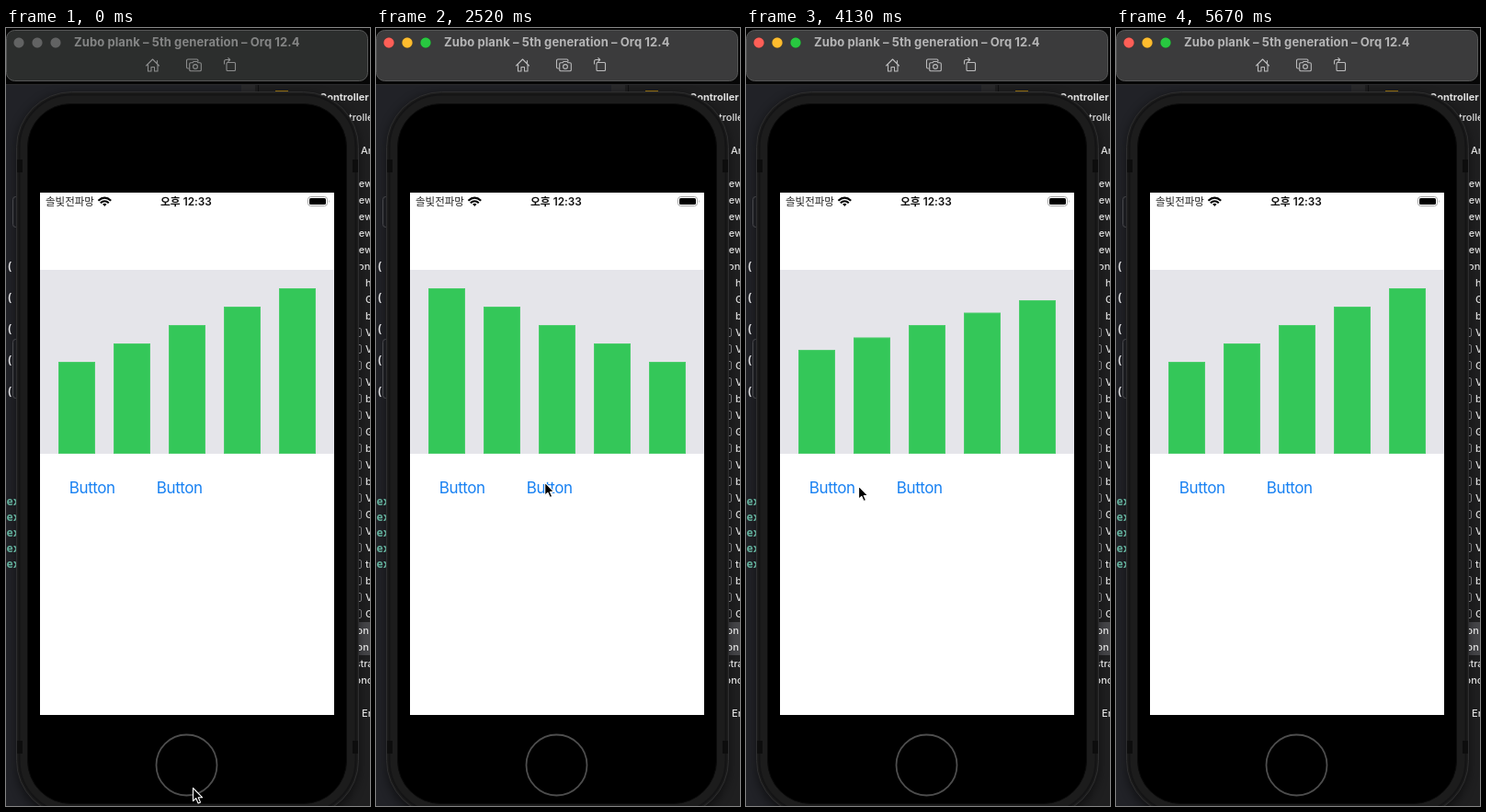
These frames come from a looping animation (396 px wide and 846 px high, 6.16 s). An HTML page:

```html
<!DOCTYPE html>
<html lang="ko">
<head>
<meta charset="utf-8">
<title>Bar chart in a phone simulator</title>
<style>
  html, body { margin: 0; width: 100%; height: 100%; overflow: hidden; background: #000; }
  svg { display: block; width: 100%; height: 100%; }
  text { font-family: Inter, "Noto Sans CJK KR", "Noto Sans CJK", sans-serif; white-space: pre; }
  .code text { font: 600 12px "Noto Sans Mono", monospace; }
  .outline text { font-size: 11px; fill: #dedede; }
  .icons { fill: none; stroke-width: 1.1; stroke-linejoin: round; stroke-linecap: round; }
  .btn { font-size: 17px; letter-spacing: -.4px; fill: #1780f2; }
</style>
</head>
<body>
<svg viewBox="0 0 396 846">
  <defs>
    <filter id="soft" x="-20%" y="-20%" width="140%" height="140%"><feGaussianBlur stdDeviation="6"/></filter>
  </defs>

  <!-- editor behind the simulator -->
  <rect width="396" height="846" fill="#212227"/>
  <rect x="256" y="62" width="140" height="784" fill="#1f1f20"/>
  <rect x="256" y="62" width="15" height="12" fill="#2a2a2c"/>
  <rect x="274" y="62" width="1" height="30" fill="#101011"/>
  <rect x="293" y="68" width="14" height="6" fill="#a57c12"/>
  <rect x="370" y="646" width="26" height="36" fill="#454548"/>
  <rect x="12" y="72" width="371" height="790" rx="60" fill="#000" opacity=".55" filter="url(#soft)"/>
  <g class="code" id="code"></g>
  <g fill="none" stroke="#47484c">
    <rect x="7.5" y="183.5" width="20" height="33" rx="3"/>
    <rect x="7.5" y="338.5" width="20" height="64" rx="3"/>
  </g>
  <g class="outline" id="outline"></g>
  <rect width="396" height="62" fill="#060606"/>
  <rect y="61" width="396" height="1" fill="#2b2b2d"/>

  <!-- title bar -->
  <rect id="bar" x=".5" y="2.5" width="393" height="55" rx="9" stroke="#555656"/>
  <g id="lights" stroke="#000" stroke-opacity=".12"></g>
  <text id="title" x="74" y="20.2" font-size="13" font-weight="700" letter-spacing=".09">Zubo plank – 5th generation – Orq 12.4</text>
  <g class="icons" id="icons">
    <path d="M152.5 41L159.5 34L166.5 41M154.5 40V47H158V42.5H161.5V47H165V40M164.5 38.5V35.5"/>
    <path d="M198.5 44H198Q196.5 44 196.5 42.5V35.5Q196.5 34 198 34H207.5Q209 34 209 35.5V36"/>
    <path d="M201 37.8H203L204 36.5H208L209 37.8H211Q212.3 37.8 212.3 39V45.5Q212.3 46.8 211 46.8H201Q199.7 46.8 199.7 45.5V39Q199.7 37.8 201 37.8Z"/>
    <circle cx="206" cy="42" r="2.4"/>
    <rect x="240" y="37.5" width="9.5" height="9" rx="1"/>
    <path d="M237.5 39V36.5Q237.5 34.5 239.5 34.5H243.5M241.8 32.6L243.7 34.5L241.8 36.4"/>
  </g>

  <!-- phone -->
  <g fill="#1b1b1c" id="keys"></g>
  <rect x="11.5" y="69.5" width="372" height="787" rx="60" fill="#1c1c1c" stroke="#2e2e2f"/>
  <rect x="14.5" y="72.5" width="366" height="781" rx="57" fill="none" stroke="#141415" stroke-width="2"/>
  <rect x="23.5" y="82.5" width="347" height="761" rx="47" fill="#000" stroke="#0b0b0b"/>
  <g fill="#0d0d0d" id="seams"></g>
  <circle cx="196.5" cy="801.5" r="33" fill="none" stroke="#4d4d4d" stroke-width="1.8"/>
  <rect x="37" y="179" width="320" height="568" fill="#fff"/>

  <!-- status bar -->
  <text x="43" y="193" font-size="11.5" fill="#222">솔빛전파망</text>
  <g fill="none" stroke="#000" stroke-width="2.1">
    <path d="M100.4 187.8Q107.3 181.5 114.2 187.8M102.8 190.3Q107.3 186.2 111.8 190.3"/>
    <path d="M105.1 191.6Q107.3 189.8 109.5 191.6L107.3 194Z" fill="#000" stroke="none"/>
  </g>
  <text x="168" y="193.2" font-size="11.8" font-weight="600" fill="#111">오후 12:33</text>
  <rect x="328.5" y="183.5" width="21" height="10" rx="3" fill="none" stroke="#a5a5a5"/>
  <rect x="330" y="185" width="18" height="7" rx="1.6"/>
  <path d="M351 186.8Q352.5 188.5 351 190.2Z" fill="#a5a5a5"/>

  <!-- app -->
  <rect x="37" y="263" width="320" height="200" fill="#e5e5ea"/>
  <g id="chart" fill="#34c759" stroke="#4ccc6c"></g>
  <text class="btn" x="68.8" y="506">Button</text>
  <text class="btn" x="163.8" y="506">Button</text>

  <path id="cursor" d="M0 0V14L3.2 11.1L5.6 16.4L8 15.4L5.7 10.2H10Z" fill="#000" stroke="#fff" stroke-width="1.1" stroke-linejoin="round"/>
</svg>

<script>
const LOOP = 6160, TICK = 70, ANIM = 500, FOCUS = 770;
const $ = id => document.getElementById(id);

function add(parent, tag, attrs, text) {
  const el = document.createElementNS("http://www.w3.org/2000/svg", tag);
  for (const k in attrs) el.setAttribute(k, attrs[k]);
  if (text) el.textContent = text;
  return parent.appendChild(el);
}

// editor text peeking out on both sides
for (let i = 0; i < 5; i++) {
  add($("code"), "text", { x: 0.5, y: 263 + 34 * i, fill: "#e2e2e4" }, "(");
  add($("code"), "text", { x: 0.5, y: 519 + 17 * i, fill: "#63b09c" }, "ex");
}
const row = (x, y, text, weight = 500) =>
  add($("outline"), "text", { x, y: y + 4, "font-weight": weight }, text);
row(341, 75, "Controller", 700);
row(373, 97, "troller");
row(386, 133, "Ar");
for (let i = 0; i < 5; i++) row(381, 169 + 18 * i, "iew");
row(383, 259, "on");
[..."hGbVVGVbVGbVbVGVVtbVG"].forEach((c, i) => {
  const y = 277 + 18 * i;
  row(391, y, c === "t" ? "tr" : c);
  if (i > 2) add($("outline"), "rect", { x: 378.5, y: y - 4.5, width: 8, height: 9, rx: 1.5, fill: "none", stroke: "#77777a" });
});
["on", "on", "stra", "onc"].forEach((s, i) => row(i < 2 ? 381.5 : 379.5, 655 + 18 * i, s));
row(387, 745, "Er");

// side keys and antenna seams
for (const x of [10, 382]) add($("keys"), "rect", { x, y: 258, width: 4, height: 65, rx: 1.5 });
for (const y of [143, 775])
  for (const x of [12, 377]) add($("seams"), "rect", { x, y, width: 6, height: 14 });

const lights = ["#fe5f57", "#febc2e", "#28c840"].map((color, i) =>
  ({ color, el: add($("lights"), "circle", { cx: 14 + 20 * i, cy: 16, r: 5.75 }) }));
const bars = [0, 1, 2, 3, 4].map(i =>
  add($("chart"), "rect", { x: 57.5 + 60 * i, width: 39 }));
const buttons = document.querySelectorAll(".btn");

// press time, button index, whether the chart responds
const taps = [[770, 0, 1], [1820, 0, 0], [2730, 1, 1], [3850, 0, 1], [4830, 1, 1]];
const HOLD = 140;

const clamp = v => Math.max(0, Math.min(1, v));
const smooth = u => u * u * (3 - 2 * u);
const rise = u => Math.pow(u, 1.6);
const fall = u => 1 - (1 - u) * (1 - u);

// cubic-bezier(.42, 0, .58, 1)
function easeInOut(x) {
  if (x <= 0 || x >= 1) return clamp(x);
  let lo = 0, hi = 1, s;
  for (let i = 0; i < 24; i++) {
    s = (lo + hi) / 2;
    const bx = 3 * s * (1 - s) * (.42 * (1 - s) + .58 * s) + s * s * s;
    if (bx < x) lo = s; else hi = s;
  }
  return smooth(s);
}

// time, x, y, easing towards this point
const path = [
  [0, 203.5, 826.5],
  [630, 101.5, 494.2, smooth],
  [2170, 101.5, 494.2, smooth],
  [2450, 194, 495.5, smooth],
  [2520, 183.7, 494.2, smooth],
  [3290, 183.7, 494.2, smooth],
  [3640, 115.7, 498.7, smooth],
  [4060, 115.7, 498.7, smooth],
  [4410, 181.7, 494.2, smooth],
  [5110, 181.7, 494.2, smooth],
  [5390, 198, 786, rise],
  [5670, 206, 848, fall]
];

function pointer(t) {
  const i = path.findIndex(p => p[0] > t);
  if (i < 0) return path[path.length - 1].slice(1, 3);
  const [t0, x0, y0] = path[i - 1], [t1, x1, y1, ease] = path[i];
  const u = ease((t - t0) / (t1 - t0));
  return [x0 + (x1 - x0) * u, y0 + (y1 - y0) * u];
}

function draw(t) {
  const active = t >= FOCUS;
  $("bar").setAttribute("fill", active ? "#3b3b3c" : "#2c2e2d");
  $("title").setAttribute("fill", active ? "#b5b5b6" : "#848585");
  $("icons").setAttribute("stroke", active ? "#bcbcbd" : "#8c8d8d");
  for (const l of lights) l.el.setAttribute("fill", active ? l.color : "#626363");

  let flip = 0;
  const held = [false, false];
  for (const [at, button, moves] of taps) {
    if (t >= at && t < at + HOLD) held[button] = true;
    if (moves && t >= at + HOLD) {
      const u = easeInOut((t - at - HOLD) / ANIM);
      flip = button ? 1 - u : u;
    }
  }
  buttons.forEach((b, i) => b.setAttribute("opacity", held[i] ? .75 : 1));

  bars.forEach((bar, i) => {
    const h = 140 + 20 * (i - 2) * (1 - 2 * flip);
    bar.setAttribute("y", 463.5 - h);
    bar.setAttribute("height", h - 1);
  });

  $("cursor").setAttribute("transform", `translate(${pointer(t)})`);
}

const start = performance.now();
function loop() {
  const t = (performance.now() - start) % LOOP;
  draw(Math.floor(t / TICK) * TICK);
  requestAnimationFrame(loop);
}
loop();
</script>
</body>
</html>
```
